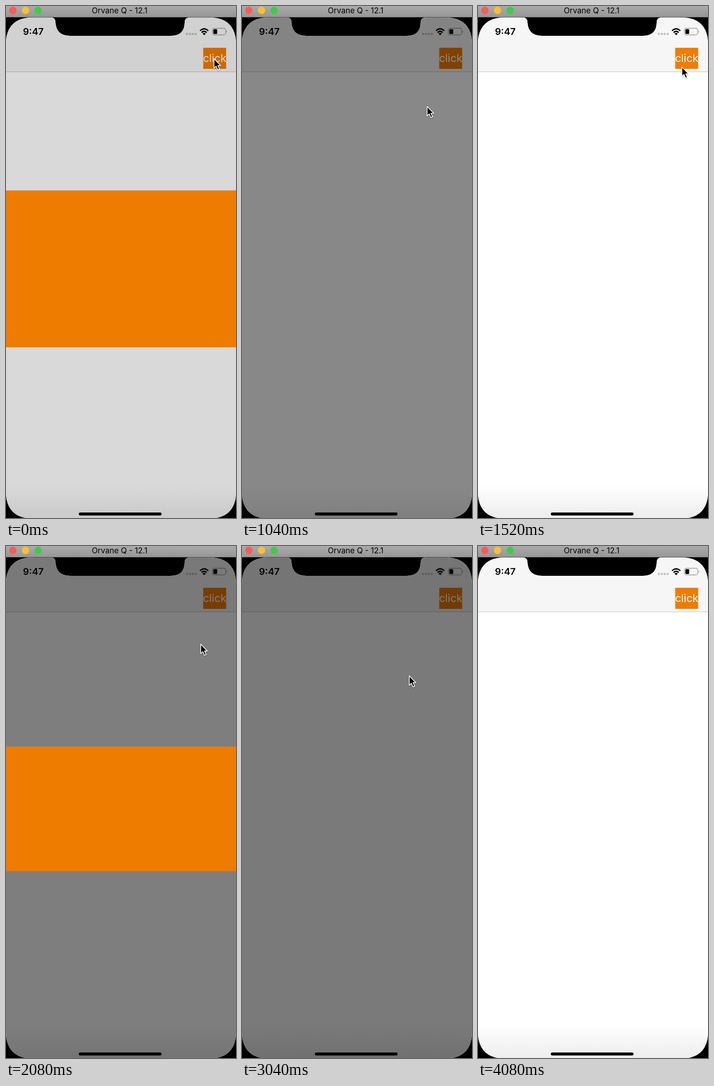
Recreate the animation shown at these times as an HTML page. Size 502 by 1116 pixels, loop 4160 ms.

```html
<!DOCTYPE html>
<html lang="en">
<head>
<meta charset="utf-8">
<title>Popup animation</title>
<style>
  html, body { margin: 0; width: 100%; height: 100%; overflow: hidden; background: #000; }
  svg { display: block; width: 100%; height: 100%; }
  text { font-family: Inter, Roboto, sans-serif; }
</style>
</head>
<body>
<svg viewBox="0 0 502 1116">
  <defs>
    <linearGradient id="titleFill" x2="0" y2="1">
      <stop stop-color="#aaa"/><stop offset="1" stop-color="#969696"/>
    </linearGradient>
    <linearGradient id="bottomFade" x2="0" y2="1">
      <stop stop-color="#fff"/><stop offset="1" stop-color="#ededed"/>
    </linearGradient>
    <clipPath id="screen">
      <path d="M57 25H98Q108 25 108 36Q110 65 140 65H360Q389 65 390 36Q390 25 401 25H445
               C482 25 502 46 502 82V1060C502 1096 482 1117 445 1117H57
               C20 1117 0 1096 0 1060V82C0 46 20 25 57 25Z"/>
    </clipPath>
    <filter id="shadow" x="-50%" y="-50%" width="200%" height="200%">
      <feDropShadow dx="0" dy="1.5" stdDeviation="1.2" flood-opacity=".35"/>
    </filter>
  </defs>

  <rect width="502" height="1116"/>
  <rect width="502" height="24.5" fill="url(#titleFill)"/>
  <circle cx="15" cy="9.5" r="8" fill="#fc5b55"/>
  <circle cx="42.5" cy="9.5" r="8" fill="#fdbe30"/>
  <circle cx="70" cy="9.5" r="8" fill="#3ecb48"/>
  <text x="248" y="16" font-size="17" text-anchor="middle">Orvane Q - 12.1</text>

  <g clip-path="url(#screen)">
    <rect y="24" width="502" height="1092" fill="#fff"/>
    <rect y="1045" width="502" height="71" fill="url(#bottomFade)"/>
    <rect y="24" width="502" height="119" fill="#f6f6f6"/>
    <rect y="143" width="502" height="1" fill="#bcbcbc"/>

    <text x="37" y="63" font-size="20.5" font-weight="600">9:47</text>
    <g fill="#bfbfbf">
      <circle cx="395" cy="61" r="2.4"/><circle cx="401.5" cy="61" r="2.4"/>
      <circle cx="407.5" cy="61" r="2.4"/><circle cx="414" cy="61" r="2.4"/>
    </g>
    <g fill="none" stroke="#000" stroke-width="3">
      <path d="M423.5 54Q432.5 45.5 441.5 54"/>
      <path d="M427 57.8Q432.5 52.6 438 57.8"/>
    </g>
    <path d="M429 60.2Q432.5 57 436 60.2L432.5 63.5Z"/>
    <rect x="450.5" y="48.5" width="29" height="14.5" rx="4" fill="none" stroke="#999" stroke-width="1.3"/>
    <rect x="452.5" y="50.5" width="8.5" height="10.5" rx="2"/>
    <path d="M481 53.5Q484 56 481 58.5Z" fill="#999"/>

    <rect x="430.5" y="91" width="50" height="46" fill="#f07c00"/>
    <text x="455.5" y="122" font-size="23.5" text-anchor="middle" fill="#fff">click</text>

    <rect id="dim" y="24" width="502" height="1092"/>
    <rect id="popup" x="-251" y="-135" width="502" height="270" fill="#ee7c00"/>
  </g>
  <rect x="159" y="1104" width="180.5" height="6.5" rx="3.2"/>

  <path id="cursor" d="M0 0V20.5L4.7 16.2L8.2 24.2L11.8 22.6L8.4 14.8H14.4Z"
        stroke="#fff" stroke-width="1.6" stroke-linejoin="round" filter="url(#shadow)"/>
</svg>

<script>
const LOOP = 4160, STEP = 80;
const DIM_ALPHA = 0.522, FADE = 400, SHRINK = 200, FADE_DELAY = 260;
const sessions = [{ open: -140, close: 700 }, { open: 1720, close: 2840 }];

// time, x, y of the pointer's tip
const pointerKeys = [
  [0, 454, 115], [160, 454, 115], [640, 404, 219], [1120, 404, 219],
  [1520, 445, 133], [1680, 452, 117], [1840, 452, 117], [2160, 420, 232],
  [2400, 390, 260], [2720, 365, 283], [3520, 365, 283], [4000, 106, -28]
];

const [dim, popup, cursor] = ["dim", "popup", "cursor"].map(id => document.getElementById(id));
const clamp = v => Math.min(1, Math.max(0, v));
const ease = v => { const p = clamp(v); return p * p * (3 - 2 * p); };

// Springs past full size, then settles
const spring = s => 1 - Math.exp(-9.45 * s) * Math.cos(22.4 * s);

function pointerAt(t) {
  const next = pointerKeys.findIndex(key => key[0] > t);
  if (next < 0) return pointerKeys.at(-1).slice(1);
  const [t0, x0, y0] = pointerKeys[next - 1], [t1, x1, y1] = pointerKeys[next];
  const p = ease((t - t0) / (t1 - t0));
  return [x0 + (x1 - x0) * p, y0 + (y1 - y0) * p];
}

function render(t) {
  let alpha = 0, scale = 0;
  for (const { open, close } of sessions) {
    if (t < open) continue;
    alpha += DIM_ALPHA * (ease((t - open) / FADE) - ease((t - close - FADE_DELAY) / FADE));
    scale += spring((t - open) / 1000) * (1 - clamp((t - close) / SHRINK));
  }
  dim.setAttribute("opacity", alpha);
  popup.setAttribute("transform", `translate(251 573) scale(${scale})`);
  cursor.setAttribute("transform", `translate(${pointerAt(t)})`);
}

const start = performance.now();
function tick() {
  const t = (performance.now() - start) % LOOP;
  render(Math.floor(t / STEP) * STEP);
  requestAnimationFrame(tick);
}
tick();
</script>
</body>
</html>
```
